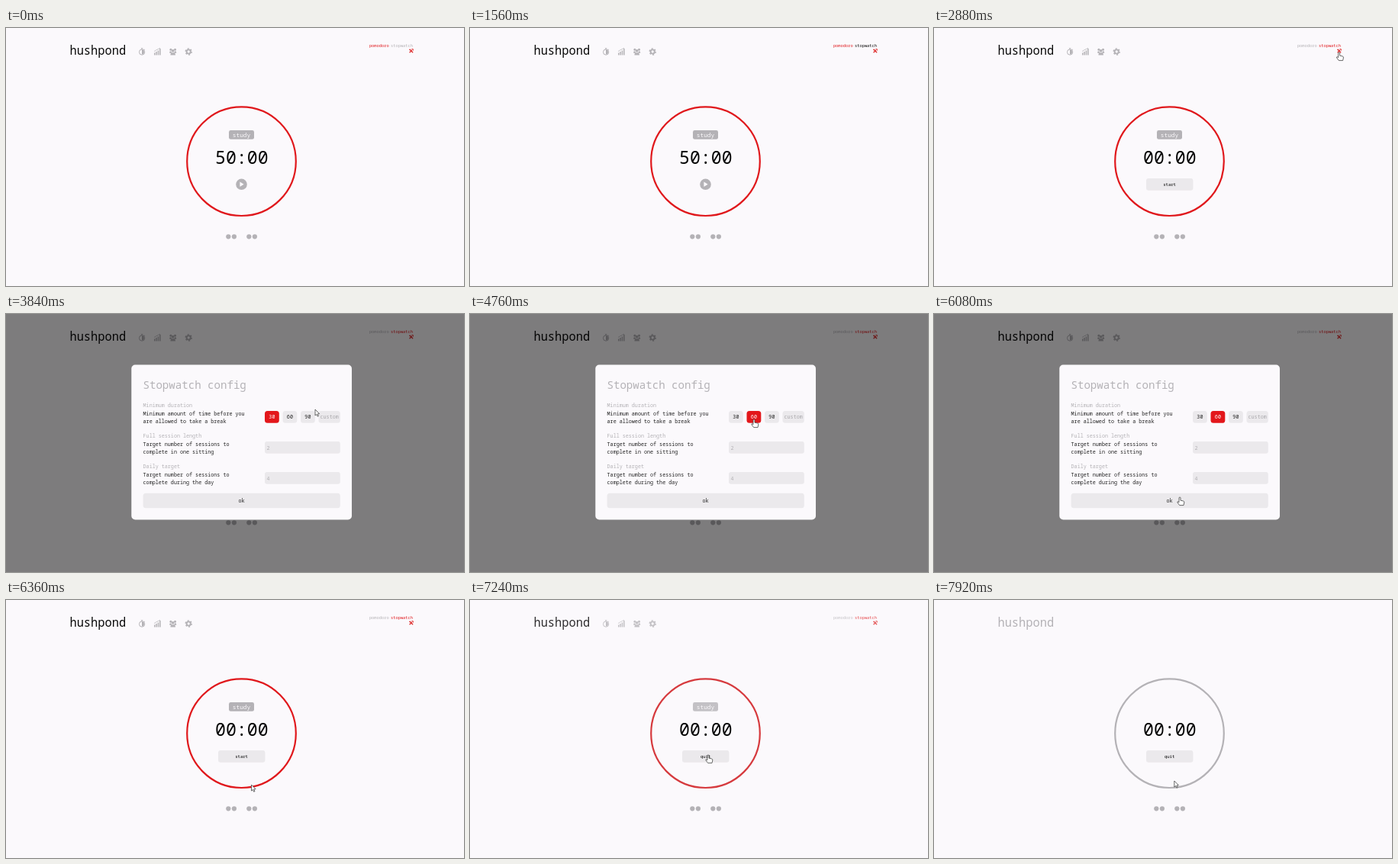
These frames come from a looping animation (600x338 px, 8000 ms). An HTML page:

```html
<!DOCTYPE html>
<html lang="en">
<head>
<meta charset="utf-8">
<title>Study timer</title>
<style>
html, body { margin: 0; width: 100%; height: 100%; overflow: hidden; background: #fbf9fc }
svg { display: block; width: 100vw; height: 100vh; font-family: "Noto Sans Mono", "DejaVu Sans Mono", monospace }
.mid { text-anchor: middle }
.tiny { font-size: 5.38px }
.body { font-size: 6.73px; fill: #222 }
.grey { fill: #b4b2b6 }
.field { fill: #ebe9ec }
.line { fill: none; stroke: #b4b2b6 }
</style>
</head>
<body>
<svg viewBox="0 0 600 338">
  <rect width="600" height="338" fill="#fbf9fc"/>
  <text id="brand" x="83.4" y="35.2" font-size="15.4">hushpond</text>

  <g id="nav" class="grey">
    <circle class="line" cx="178.1" cy="31.6" r="3.6" stroke-width="1"/>
    <path d="M178 31.6V28.6A3 3 0 0 1 178 34.6ZM176.9 26.3h2.4v1.2h-2.4zM181 27.4l1 1-.7.7-1-1z"/>
    <path d="M194 32.6h1.5v3H194zM196.3 31h1.5v4.6h-1.5zM198.7 29.6h1.5v6h-1.5zM201.1 27h1.5v8.6h-1.5z"/>
    <path class="line" d="M194 30.6l3-1.8 2-1 3-1.6" stroke-width=".7"/>
    <circle cx="215.9" cy="28.3" r="1.5"/><circle cx="221.5" cy="28.3" r="1.5"/><circle cx="218.7" cy="29.9" r="1.8"/>
    <path d="M214 32.6q0-2.4 2.2-2.4l1 2.2-1 .6zM223.4 32.6q0-2.4-2.2-2.4l-1 2.2 1 .6zM215.4 35.4q0-3.2 3.3-3.2t3.3 3.2z"/>
    <circle class="line" cx="239.2" cy="31" r="2.6" stroke-width="1.9"/>
    <circle class="line" cx="239.2" cy="31" r="4" stroke-width="1.4" stroke-dasharray="2.09 2.1"/>
  </g>

  <g id="modes" class="tiny">
    <text id="pomodoro" x="475.9" y="24.6">pomodoro</text>
    <text id="stopwatch" x="504" y="24.6">stopwatch</text>
    <g stroke="#df3030" fill="none" stroke-width="1.3">
      <path d="M528.7 27.8l4.4 4.4M528.6 32.2l3.2-3.2"/>
      <path d="M531.4 27.7h1.9v1.9M528.4 28.6h1.6" stroke-width="1"/>
    </g>
  </g>

  <circle id="ring" cx="308.5" cy="174.7" r="71.3" fill="none" stroke-width="2.2"/>
  <g id="badge">
    <rect class="grey" x="292" y="134" width="33" height="11.8" rx="2.4"/>
    <text class="mid" x="308.5" y="142.7" font-size="7.8" fill="#fbf9fc">study</text>
  </g>
  <text id="clock" class="mid" x="308.8" y="178.4" font-size="23.2"></text>
  <g id="play">
    <circle class="grey" cx="308.5" cy="204.8" r="7.3"/>
    <path d="M306.4 201.6v6.4l5.2-3.2z" fill="#fbf9fc"/>
  </g>
  <g id="action">
    <rect class="field" x="278" y="197" width="61.4" height="15.8" rx="3"/>
    <text id="label" class="mid" x="308.6" y="206.8" font-size="5.6"></text>
  </g>
  <g class="grey">
    <circle cx="291.3" cy="273.3" r="3.1"/><circle cx="298.9" cy="273.3" r="3.1"/>
    <circle cx="318.3" cy="273.3" r="3.1"/><circle cx="325.9" cy="273.3" r="3.1"/>
  </g>

  <g id="modal">
    <rect width="600" height="338" opacity=".5"/>
    <rect x="164.3" y="66.5" width="288.7" height="203" rx="5" fill="#fbf9fc"/>
    <text class="grey" x="179.5" y="98.4" font-size="14.1">Stopwatch config</text>
    <g id="rows" class="body"></g>
    <g id="choices" class="body mid"></g>
    <g class="field">
      <rect x="339" y="167" width="98.8" height="15.8" rx="3"/>
      <rect x="339" y="207" width="98.8" height="15.8" rx="3"/>
      <rect x="179.6" y="234.8" width="258.2" height="19.4" rx="3.5"/>
    </g>
    <g class="body">
      <text class="grey" x="341.4" y="177.5">2</text>
      <text class="grey" x="341.4" y="217.5">4</text>
      <text class="mid" x="308.6" y="247">ok</text>
    </g>
  </g>

  <g id="cursor" fill="#fff" stroke="#444" stroke-width=".8" stroke-linejoin="round">
    <path id="arrow" d="M0 0V8L1.8 6.4 3.1 9.2 4.5 8.6 3.2 5.9 5.6 5.7Z"/>
    <path id="hand" d="M-1 1Q-1 0 0 0T1 1V4.2L4.6 5Q6 5.4 5.8 7L5 10.6H-.3L-3 7Q-3.6 5.6-2.2 5.8L-1 6.7Z"/>
  </g>
</svg>
<script>
const $ = id => document.getElementById(id);
const RED = [224, 24, 28], GREY = [180, 178, 182], BLACK = [10, 10, 10];
const LOOP = 8000, STEP = 40;

// pointer stops: time, x, y
const path = [
  [320, 334, 237], [1080, 377, 146], [1200, 377, 146], [1560, 513, 23], [2000, 513, 23],
  [2280, 500, 47], [2560, 524, 42], [2800, 530.6, 32], [3280, 530.6, 32], [3840, 405, 125],
  [4080, 372, 138], [5120, 372, 138], [5520, 367, 166], [5920, 331, 223], [6080, 322, 240],
  [6360, 321.5, 242], [6520, 321.5, 242], [7040, 312, 203], [7360, 312, 203], [7920, 314.8, 237]
];

$('rows').innerHTML = [
  ['Minimum duration', 'Minimum amount of time before you', 'are allowed to take a break'],
  ['Full session length', 'Target number of sessions to', 'complete in one sitting'],
  ['Daily target', 'Target number of sessions to', 'complete during the day']
].map((lines, r) => lines.map((s, i) =>
  `<text x="179.6" y="${122.4 + r * 40 + i * 10.1}" ${i ? '' : 'class="grey"'}>${s}</text>`).join('')).join('');

$('choices').innerHTML = ['30', '60', '90', 'custom'].map((s, i) => {
  const x = 339 + i * 23.5, w = i < 3 ? 18.8 : 28.3;
  return `<g><rect x="${x}" y="127" width="${w}" height="15.8" rx="3.5"/><text x="${x + w / 2}" y="137.3">${s}</text></g>`;
}).join('');

const ramp = (t, a, b) => Math.min(1, Math.max(0, (t - a) / (b - a)));
const within = (t, a, b) => t >= a && t < b;
const mix = (a, b, k) => `rgb(${a.map((v, i) => v + (b[i] - v) * k)})`;
const show = (id, on) => $(id).style.display = on ? '' : 'none';
const paint = (id, color, prop = 'fill') => $(id).style[prop] = color;

function pointer(t) {
  const i = path.findIndex(p => p[0] > t);
  if (i < 0) return path[path.length - 1].slice(1);
  if (!i) return path[0].slice(1);
  const a = path[i - 1], b = path[i], k = ramp(t, a[0], b[0]);
  return [a[1] + (b[1] - a[1]) * k, a[2] + (b[2] - a[2]) * k];
}

function draw(t) {
  const swapped = t >= 1720, focus = ramp(t, 7160, 7520);
  $('clock').textContent = swapped ? '00:00' : '50:00';
  $('label').textContent = t >= 7200 ? 'quit' : 'start';
  show('play', !swapped);
  show('action', swapped);

  paint('pomodoro', mix(RED, GREY, ramp(t, 1680, 1840)));
  paint('stopwatch', t < 2000
    ? mix(GREY, BLACK, ramp(t, 1400, 1520))
    : mix(BLACK, RED, ramp(t, 1960, 2120)));
  paint('brand', mix(BLACK, GREY, focus));
  paint('ring', mix(RED, GREY, focus), 'stroke');
  for (const id of ['nav', 'modes', 'badge']) $(id).style.opacity = 1 - focus;

  show('modal', within(t, 3120, 6160));
  const chosen = t < 4160 ? 0 : 1;
  [...$('choices').children].forEach((g, i) => {
    g.children[0].style.fill = i === chosen ? '#e3171b' : '#ebe9ec';
    g.children[1].style.fill = i === chosen ? '#fff' : i === 3 ? '#aaa8ac' : '#222';
  });

  const hand = within(t, 1720, 2040) || within(t, 2720, 3120) || within(t, 4000, 5160) ||
    within(t, 6040, 6160) || within(t, 6920, 7480);
  show('cursor', within(t, 320, 1520) || t >= 1720);
  show('hand', hand);
  show('arrow', !hand);
  $('cursor').setAttribute('transform', `translate(${pointer(t)})`);
}

function tick() {
  draw(Math.floor(performance.now() % LOOP / STEP) * STEP);
  requestAnimationFrame(tick);
}
tick();
</script>
</body>
</html>
```
